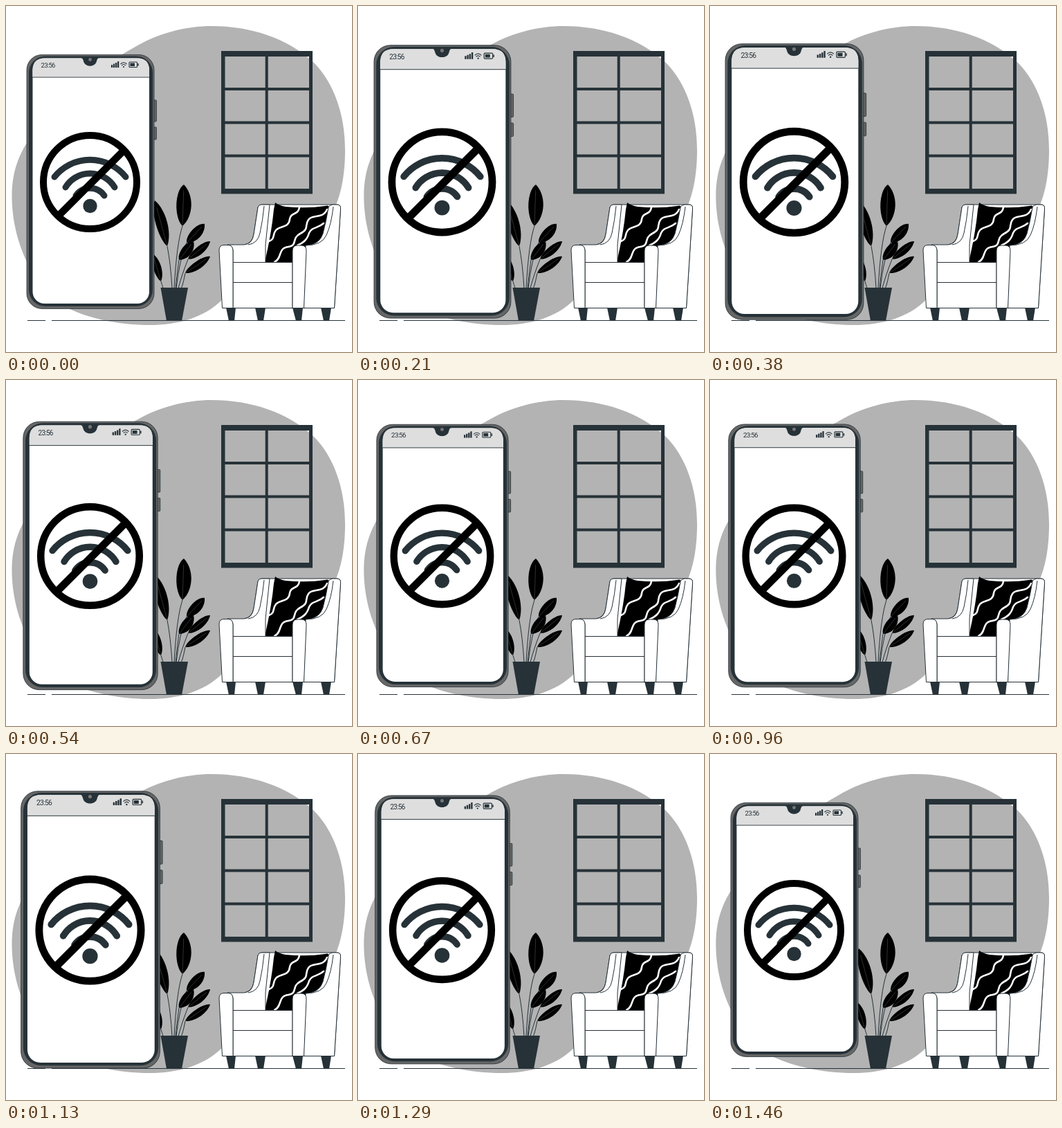
An HTML page for the animation above (1.5 s loop, 500 by 500 pixels).

```html
<!DOCTYPE html>
<html lang="en">
<head>
<meta charset="utf-8">
<title>No signal</title>
<style>
  html, body { margin: 0; width: 100%; height: 100%; overflow: hidden; background: #fff; }
  svg { display: block; width: 100vw; height: 100vh; }
  .ink { fill: #263238; }
  .line { fill: none; stroke: #263238; }
  .sofa { fill: #fff; stroke: #263238; stroke-width: 1; stroke-linejoin: round; }
  .clock { font: 9.5px Roboto, sans-serif; font-stretch: condensed; letter-spacing: -.7px; }
</style>
</head>
<body>
<svg viewBox="0 0 500 500">
  <path fill="#b3b3b3" d="M297 29C355 29 406 47 443 80C474 110 490 157 490 208C490 245 484 272 475 292C440 370 345 390 313 424C286 451 247 461 208 461C160 461 120 451 90 437C40 410 8.500 340 8.500 275C8.500 237 20 207 45 178C95 122 130 90 185 60C220 39 260 29 297 29Z"/>

  <g id="window" class="ink">
    <path fill-rule="evenodd" d="M311 65H443V271.500H311ZM316.500 73V264H438V73Z"/>
    <path d="M374.700 72h4v193h-4zM315 118h124v4H315zM315 166.500h124v4H315zM315 214.500h124v4H315z"/>
  </g>

  <path class="line" d="M31 454.500H57M66 454.500H490"/>

  <g id="plant">
    <g id="stems" class="line"></g>
    <g id="leaves"></g>
    <path class="ink" d="M223.500 407H263L254 455H232Z"/>
  </g>

  <g id="chair">
    <path class="ink" d="M318 436h14l-2 19h-8zM360 436h15l-3 19h-8zM414 436h15l-2 19h-8zM455 436h15l-3 19h-8z"/>
    <path class="sofa" d="M364 291Q365 287 370 287H478Q484 287 483.500 293L474.500 436H329V350L345 345Q356 342 358 330Z"/>
    <path class="sofa" d="M364 291Q365 287 369 287H381L375 345V371H328V354Q328 346 320 345H344Q356 344 358 330Z"/>
    <path class="line" d="M373 289Q371 310 367 328Q364 343 350 345"/>
    <path d="M389 284Q394 288 404 290Q435 293 461 289Q467 287 467 292Q460 316 456 346L434 371H376Q374 370 376 361Q384 325 387 294Z"/>
    <g fill="none" stroke="#fff" stroke-width="2.600" stroke-linecap="round">
      <path d="M424 291C422 303 412 297 410 308C409 321 396 317 390 324C385 330 389 337 380 340"/>
      <path d="M464 294C457 309 443 300 437 309C431 317 439 322 425 329C412 336 422 346 408 348C392 350 400 364 388 370"/>
      <path d="M459 314C450 322 442 319 438 328C435 338 430 342 421 346"/>
    </g>
    <path class="sofa" d="M328 370.500H414V436.500H328Z"/>
    <path class="line" d="M328 399.500H414"/>
    <path class="sofa" d="M308 353Q308 345.500 315 345.500H321Q328 345.500 328 354V436.500H312.500Z"/>
    <path class="sofa" d="M466 291Q468 287 472 287H478Q484 287 483.500 293L474.500 436.500H430L433 346Q453 345 458 329Q463 310 466 291Z"/>
    <path class="line" d="M473 290Q470 316 463 331Q457 346 432 346"/>
    <path class="sofa" d="M414 354Q414 346 421 346H427Q434 346 434 354L430.500 436.500H414Z"/>
  </g>

  <g id="phone">
    <g fill="#666" stroke="#263238" stroke-width=".8">
      <rect x="212" y="136" width="5.400" height="31" rx="1"/>
      <rect x="212" y="175" width="5.400" height="18" rx="1"/>
      <rect x="30" y="70.400" width="184" height="367" rx="22"/>
    </g>
    <rect class="ink" x="33" y="72.500" width="179" height="361.500" rx="24"/>
    <rect x="38.500" y="75.500" width="168.500" height="354.500" rx="17" fill="#fff"/>
    <path fill="#dedede" d="M38.500 103V92.500Q38.500 75.500 55.500 75.500H190Q207 75.500 207 92.500V103Z"/>
    <path class="line" stroke-width=".9" d="M38 103H207.500"/>
    <path class="ink" d="M107 74.500C111 75 111 77 112 79.500C113.500 89 129.500 89 131 79.500C132 77 132 75 136 74.500Z"/>
    <circle cx="121.500" cy="77.500" r="2.400" fill="#777"/>
    <text class="clock ink" x="50.500" y="89">23:56</text>
    <path class="ink" d="M152 85h2.200v4H152zM155 83.500h2.200V89H155zM158 82h2.200v7H158zM161 80h2.200v9H161z"/>
    <g class="line" stroke-width="1.100">
      <path d="M165.500 84Q170 79.500 174.500 84M167.200 86Q170 83 172.800 86"/>
      <rect x="178" y="81" width="11.500" height="7.500" rx="1"/>
    </g>
    <path class="ink" d="M179.500 82.500h6.500v4.500h-6.500zM190.300 83h1.400v3.500h-1.400z"/>
    <circle class="ink" cx="170" cy="88" r="1.100"/>

    <path class="line" stroke-width="9" stroke-linecap="round" d="M70 247A66 66 0 0 1 173 247M86 262A41.500 41.500 0 0 1 157 262M101 274A25 25 0 0 1 142 274"/>
    <circle class="ink" cx="121.500" cy="289" r="10.200"/>
    <g fill="none" stroke="#000">
      <circle cx="121.500" cy="254.500" r="67.500" stroke-width="10"/>
      <path stroke-width="10.500" d="M171.500 207.500L74 305"/>
    </g>
  </g>
</svg>
<script>
  const $ = id => document.getElementById(id);

  // base x, y, tip x, y, half width, foot of the stem
  const leaves = [
    [255, 318, 257, 258, 13, 243],
    [233, 347, 215, 281, 10, 240],
    [261, 342, 287, 315, 9, 246],
    [250, 367, 271, 340, 9, 245],
    [263, 366, 295, 340, 7, 249],
    [259, 386, 295, 362, 7, 252],
    [224, 398, 212, 358, 7, 234]
  ];

  for (const [bx, by, tx, ty, w, foot] of leaves) {
    const dx = tx - bx, dy = ty - by, len = Math.hypot(dx, dy);
    const nx = -dy / len * w, ny = dx / len * w;
    const ctrl = (k, side) => `${bx + dx * k + nx * side} ${by + dy * k + ny * side}`;
    $('stems').innerHTML += `<path d="M${foot} 408Q${foot + (bx - foot) * .3} ${by + 25} ${bx} ${by}"/>`;
    $('leaves').innerHTML +=
      `<path d="M${bx} ${by}C${ctrl(.25, 1.2)} ${ctrl(.75, 1.2)} ${tx} ${ty}` +
      `C${ctrl(.85, -1)} ${ctrl(.2, -1)} ${bx} ${by}Z"/>` +
      `<path d="M${bx} ${by}L${bx + dx * .85} ${by + dy * .85}" stroke="#777" stroke-width=".4"/>`;
  }

  // Double heartbeat: [progress, swell]
  const LOOP = 1500, STEPS = 36, SWELL = .102, CX = 121.8, CY = 254;
  const beats = [[0, 0], [.195, 1], [.585, 0], [.795, 1], [1, 0]];

  function swell(p) {
    const i = Math.max(1, beats.findIndex(b => b[0] >= p));
    const [p0, a] = beats[i - 1], [p1, b] = beats[i];
    return a + (b - a) * (p - p0) / (p1 - p0);
  }

  function draw(now) {
    const step = Math.min(STEPS - 1, Math.floor((now % LOOP + 5) * STEPS / LOOP));
    const s = 1 + SWELL * swell(step / (STEPS - 1));
    $('phone').setAttribute('transform', `translate(${CX} ${CY}) scale(${s}) translate(${-CX} ${-CY})`);
  }

  const start = performance.now();
  function tick() {
    draw(performance.now() - start);
    requestAnimationFrame(tick);
  }
  tick();
</script>
</body>
</html>
```
